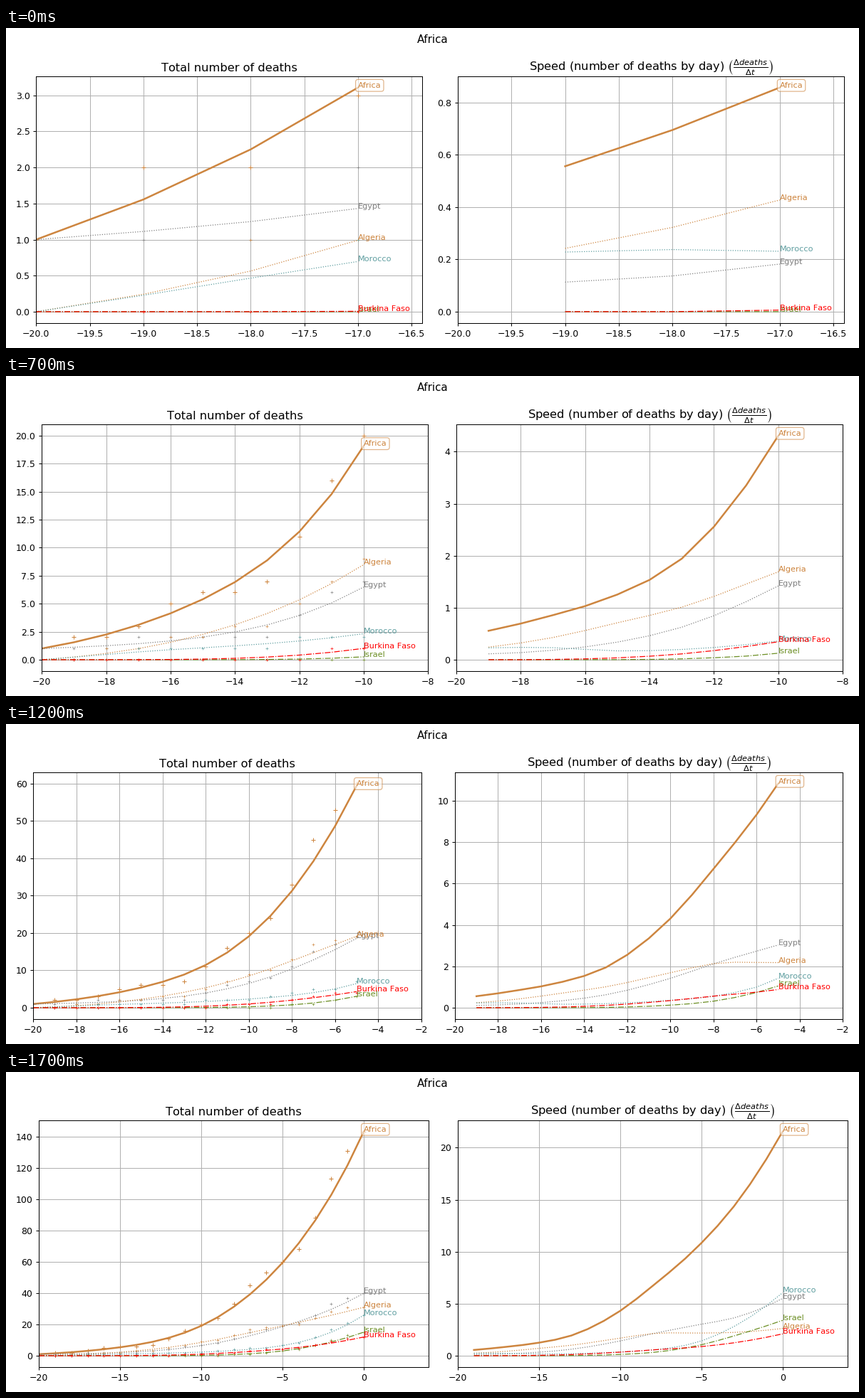
Recreate the animation shown at these times as a matplotlib script. Size 1197 px wide and 450 px high, loop 4.7 s.

```python
import numpy as np
import matplotlib.pyplot as plt
from matplotlib.animation import FuncAnimation

START, FIRST_END, LAST_END = -20, -17, 0
FRAMES, INTERVAL = 47, 100
days = np.arange(START, LAST_END + 1)

# Daily speeds are given on a few key days and joined by smooth curves.
KEY_DAYS = np.array([-19, -17, -15, -13, -10, -8, -5, -3, 0])
# name: (colour, line style, total on the first day, speed on the key days)
SERIES = {
    "Africa": ("peru", "-", 1,
               [.556, .857, 1.253, 1.942, 4.31, 6.71, 10.83, 14.35, 21.55]),
    "Egypt": ("gray", ":", 1,
              [.113, .182, .338, .625, 1.42, 2.12, 3.03, 3.63, 5.5]),
    "Algeria": ("peru", ":", 0,
                [.242, .427, .71, 1.01, 1.69, 2.13, 2.18, 2.24, 2.62]),
    "Morocco": ("cadetblue", ":", 0,
                [.228, .231, .17, .197, .36, .55, 1.42, 2.8, 6.05]),
    "Israel": ("olivedrab", "-.", 0,
               [0, 0, .002, .017, .125, .315, 1.05, 1.9, 3.4]),
    "Burkina Faso": ("red", "-.", 0,
                     [0, .006, .036, .112, .345, .56, .88, 1.24, 2.1]),
}

# Counted values swing around the smooth totals.
SWING = np.interp(days, [-20, -19, -18, -16, -13, -11, -9, -7, -4, -2, -1, 0],
                  [1, 1.28, .9, 1.2, .79, 1.09, .98, 1.15, .945, 1.1, 1.08, 1])

SPEED_TITLE = (r"Speed (number of deaths by day) "
               r"$\left(\frac{\Delta deaths}{\Delta t}\right)$")

plt.rcParams["text.kerning_factor"] = 6  # plain letter spacing
fig = plt.figure(figsize=(13.3, 5), dpi=90)
shown = {"end": None}


def smooth_curve(knots, values, x):
    """Cubic Hermite curve through the knots."""
    values = np.asarray(values, float)
    slopes = np.gradient(values, knots, edge_order=2)
    i = np.clip(np.searchsorted(knots, x, side="right") - 1, 0, len(knots) - 2)
    step = knots[i + 1] - knots[i]
    t = (x - knots[i]) / step
    ease = t * t * (3 - 2 * t)
    bend = t * (1 - t) * ((1 - t) * slopes[i] - t * slopes[i + 1])
    return values[i] + ease * (values[i + 1] - values[i]) + step * bend


def draw_curve(ax, name, x, y):
    color, style = SERIES[name][:2]
    main = name == "Africa"
    ax.plot(x, y, style, color=color, lw=2 if main else 1)
    box = dict(boxstyle="round", facecolor="white", edgecolor=color,
               alpha=0.6) if main else None
    ax.text(x[-1], y[-1], name, color=color, fontsize=9, bbox=box)


def draw_charts(end):
    n = end - START + 1
    fig.clear()
    # The layout always starts from the default margins.
    fig.subplots_adjust(left=0.125, right=0.9, bottom=0.11, top=0.88, wspace=0.2)
    total_ax, speed_ax = fig.subplots(1, 2)
    fig.suptitle("Africa", fontsize=12)
    for name, (color, _, first, key_speeds) in SERIES.items():
        speed = smooth_curve(KEY_DAYS, key_speeds, days[1:])
        total = first + np.append(0, np.cumsum(speed))
        counted = np.round(total * SWING)
        main = name == "Africa"
        total_ax.plot(days[:n], counted[:n], "+", color=color,
                      ms=5 if main else 3, mew=0.8 if main else 0.5)
        draw_curve(total_ax, name, days[:n], total[:n])
        draw_curve(speed_ax, name, days[1:n], speed[:n - 1])
    for ax, title in ((total_ax, "Total number of deaths"), (speed_ax, SPEED_TITLE)):
        ax.set_title(title, fontsize=13)
        ax.set_xlim(START, START + 1.2 * (end - START))
        ax.grid(True)
    fig.tight_layout()


def update(frame):
    end = min(FIRST_END + frame, LAST_END)
    if end != shown["end"]:
        draw_charts(end)
        shown["end"] = end
    return []


animation = FuncAnimation(fig, update, frames=FRAMES, interval=INTERVAL,
                          repeat=True, repeat_delay=0, blit=False)
plt.show()
```
